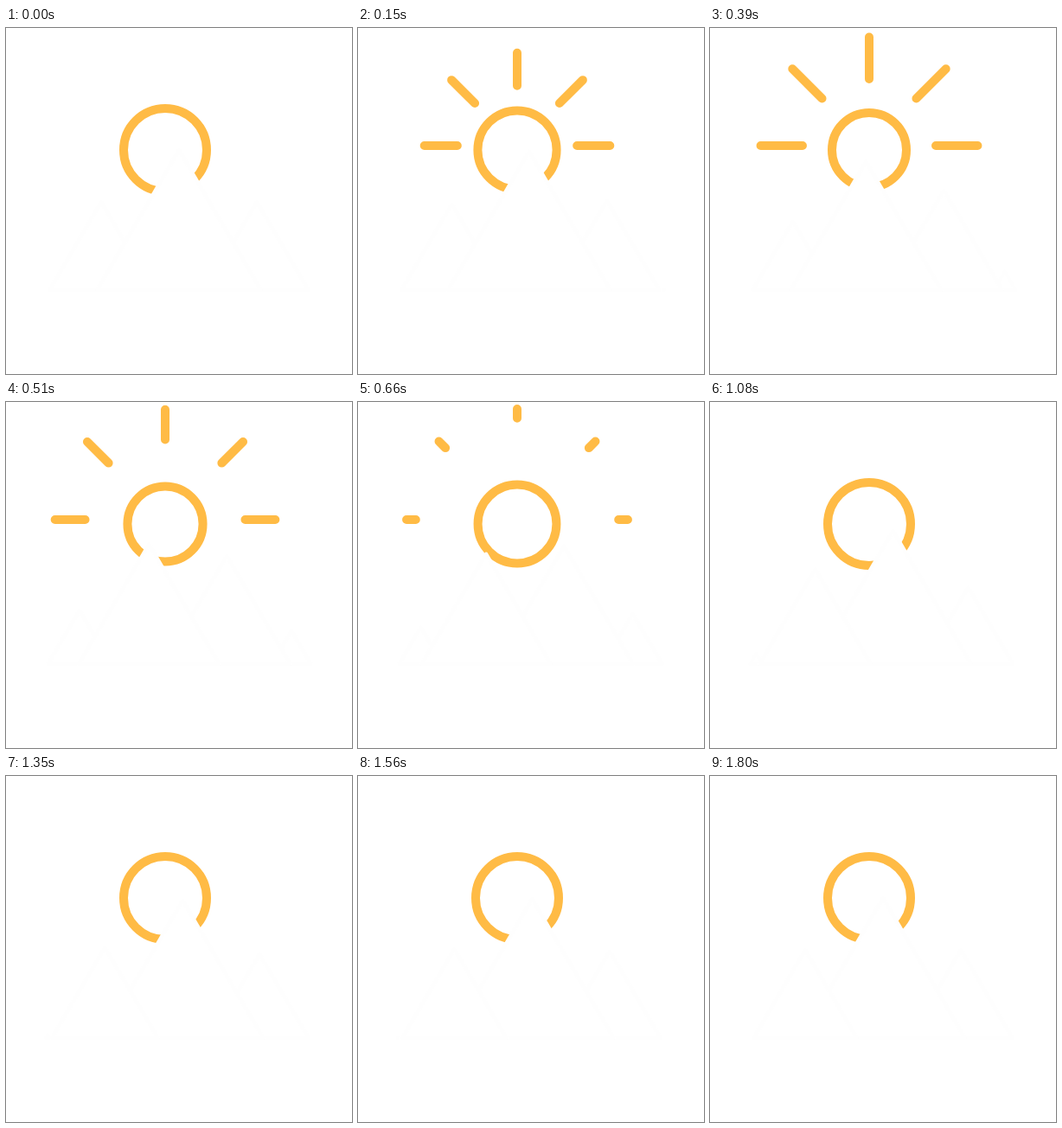
Recreate the animation shown at these times as an HTML page. Size 400x400 px, loop 1.86 s.

```html
<!DOCTYPE html>
<html lang="en">
<head>
<meta charset="utf-8">
<title>Sun over mountains</title>
<style>
  html, body { margin: 0; width: 100%; height: 100%; overflow: hidden; background: #fff; }
  svg { display: block; width: 100%; height: 100%; }
  .sun { fill: none; stroke: #ffbb45; stroke-width: 10; stroke-linecap: round; }
  .peak { fill: #fff; stroke: #fefefe; stroke-width: 4; stroke-linejoin: round; }
</style>
</head>
<body>
<svg viewBox="0 0 400 400">
  <path id="rays" class="sun"/>
  <circle id="ring" class="sun" cx="184" cy="141"/>
  <g id="range"></g>
</svg>
<script>
const LOOP = 1860, STEP = 30, LAST = 1800;
const BURST = 1080;   // rays and ring pulse
const SHRINK = 360;   // ring reaches its smallest size
const BASE = 303, SLOPE = 0.585;

// Each peak travels from its stop to the one on its left.
const stops = [[45, 300], [110, 197], [200, 137], [290, 197], [355, 300]];

const rays = document.getElementById('rays');
const ring = document.getElementById('ring');
const range = document.getElementById('range');

const clamp = x => Math.min(1, Math.max(0, x));
const mix = (a, b, k) => a + (b - a) * k;

// Cubic bezier easing with flat ends: control points (x1, 0) and (x2, 1).
function bezier(x1, x2) {
  return x => {
    let lo = 0, hi = 1;
    for (let i = 0; i < 30; i++) {
      const s = (lo + hi) / 2, r = 1 - s;
      if (3 * x1 * s * r * r + 3 * x2 * s * s * r + s * s * s < x) lo = s;
      else hi = s;
    }
    return lo * lo * (3 - 2 * lo);
  };
}
const glide = bezier(0.33, 0.19);
const pulse = bezier(0.4, 0.4);
const shootOut = x => 1 - (1 - x) ** 7;
const inOutQuart = x => x < 0.5 ? 8 * x ** 4 : 1 - 8 * (1 - x) ** 4;

const peaks = [4, 1, 3, 2].map(stop => {
  const path = document.createElementNS('http://www.w3.org/2000/svg', 'path');
  path.setAttribute('class', 'peak');
  range.append(path);
  return { stop, path };
});

function drawRays(t) {
  const x = clamp(t / BURST);
  let d = '';
  if (x > 0 && x < 1) {
    const near = mix(69, 128, inOutQuart(x));
    const far = mix(69, 128, shootOut(x));
    for (let i = 0; i < 5; i++) {
      const a = Math.PI * i / 4, c = Math.cos(a), s = Math.sin(a);
      d += `M${184 - near * c} ${136 - near * s}L${184 - far * c} ${136 - far * s}`;
    }
  }
  rays.setAttribute('d', d);
}

function drawRing(t) {
  const r = t < SHRINK
    ? mix(48, 43, pulse(t / SHRINK))
    : mix(43, 48, pulse(clamp((t - SHRINK) / (BURST - SHRINK))));
  ring.setAttribute('r', r);
}

function drawPeaks(t) {
  const p = glide(t / LOOP);
  for (const { stop, path } of peaks) {
    const [x0, y0] = stops[stop], [x1, y1] = stops[stop - 1];
    const x = mix(x0, x1, p), y = Math.min(BASE, mix(y0, y1, p) + 4);
    const half = (BASE - y) * SLOPE;
    path.setAttribute('d', `M${x - half} ${BASE}L${x} ${y}L${x + half} ${BASE}Z`);
  }
}

function draw(now) {
  const t = Math.min(LAST, Math.floor((now % LOOP) / STEP) * STEP);
  drawRays(t);
  drawRing(t);
  drawPeaks(t);
}

let start = null;
function tick(now) {
  if (start === null) start = now;
  draw(now - start);
  requestAnimationFrame(tick);
}
draw(0);
requestAnimationFrame(tick);
</script>
</body>
</html>
```
